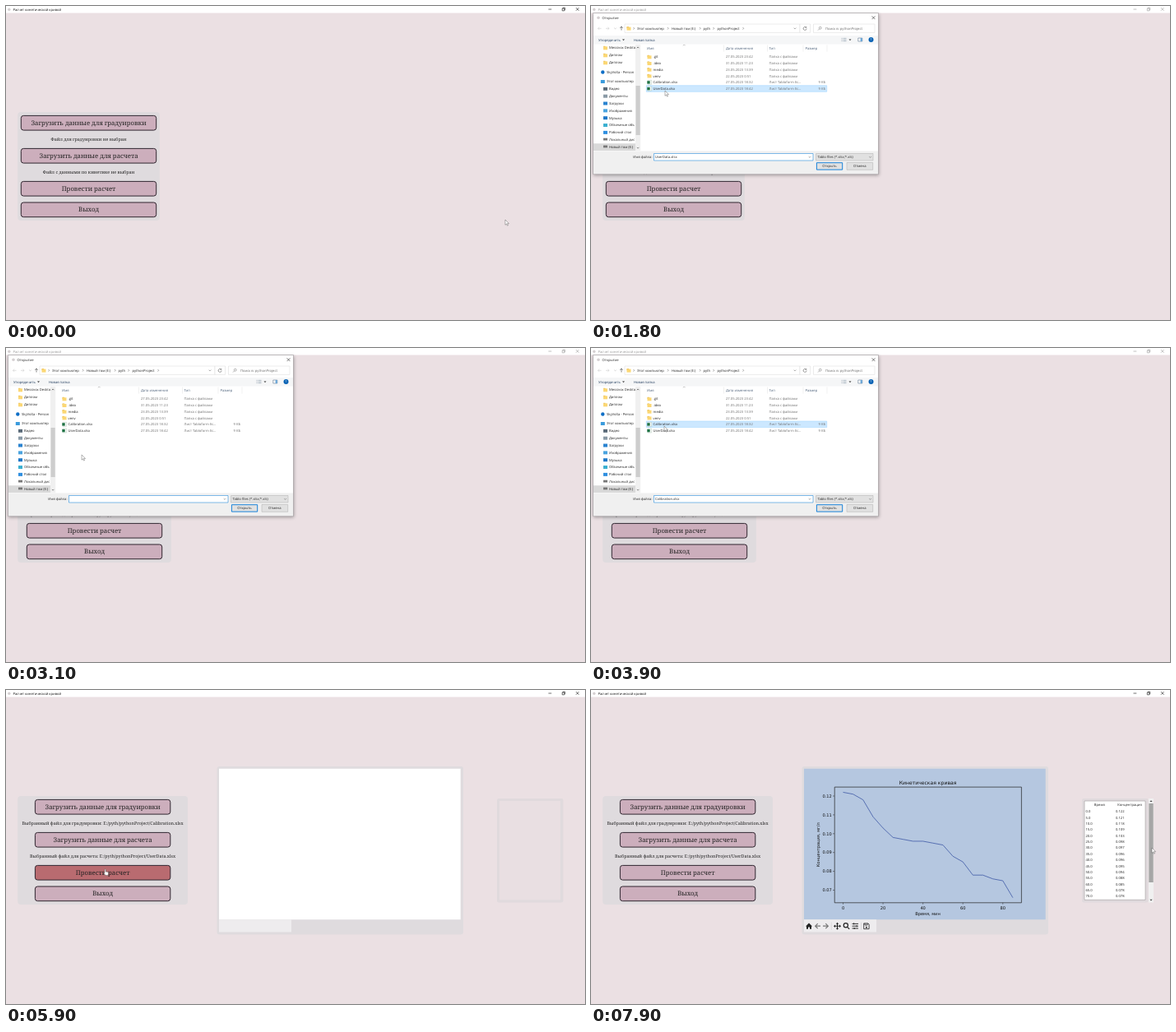
An HTML page with a canvas for the animation above (8000 ms loop, 704 px wide and 382 px high).

```html
<!DOCTYPE html>
<html lang="ru">
<head>
<meta charset="utf-8">
<title>Расчет кинетической кривой</title>
<style>
html, body { margin: 0; width: 704px; height: 382px; overflow: hidden; background: #ebe0e3; }
canvas { display: block; }
</style>
</head>
<body>
<canvas id="stage" width="704" height="382"></canvas>
<script>
const ctx = document.getElementById('stage').getContext('2d');
ctx.textRendering = 'geometricPrecision';

const UI = '"Open Sans", sans-serif', SERIF = '"Noto Serif", serif', PLOT = '"DejaVu Sans", sans-serif';
const DARK = '#222';

// Drawing helpers; text is centred vertically on y
function text(s, x, y, { size = 4.15, color = DARK, font = UI, align = 'left' } = {}) {
  ctx.font = `${size}px ${font}`;
  ctx.fillStyle = color;
  ctx.textAlign = align;
  ctx.fillText(s, x, y + size * 0.35);
}
function box(x, y, w, h, fill, border, radius = 0, width = 0.5) {
  ctx.beginPath();
  ctx.roundRect(x, y, w, h, radius);
  if (fill) { ctx.fillStyle = fill; ctx.fill(); }
  if (border) { ctx.strokeStyle = border; ctx.lineWidth = width; ctx.stroke(); }
}
function stroke(path, color = DARK, width = 0.6) {
  ctx.strokeStyle = color;
  ctx.lineWidth = width;
  ctx.stroke(new Path2D(path));
}
function fill(path, color = DARK) {
  ctx.fillStyle = color;
  ctx.fill(new Path2D(path));
}
function dot(x, y, r, color) {
  ctx.beginPath();
  ctx.arc(x, y, r, 0, 7);
  ctx.fillStyle = color;
  ctx.fill();
}
const chevron = (x, y, color = '#555') => stroke(`M${x - 1.3} ${y - 0.7}l1.3 1.3 1.3-1.3`, color, 0.5);
function folder(x, y) {
  box(x, y - 2.2, 2.6, 2, '#e5b84b');
  box(x, y - 1.7, 5, 4, '#fbd774');
}

// Pointer path: time, x, y
const pointerPath = [
  [100, 607, 260], [600, 91, 188], [900, 91, 188], [1800, 90, 103], [1900, 90, 103],
  [2400, 93, 141], [2900, 93, 141], [3600, 89, 95], [4490, 89, 95], [5400, 120, 218],
  [6500, 120, 218], [6600, 408, 112], [6700, 408, 112], [7600, 693, 196], [7900, 682, 192],
];
function pointerAt(t) {
  const i = pointerPath.findIndex(k => k[0] >= t);
  if (i < 1) return pointerPath.at(i).slice(1);
  const [t0, x0, y0] = pointerPath[i - 1], [t1, x1, y1] = pointerPath[i];
  const u = (t - t0) / (t1 - t0);
  const e = (u + u * u * (3 - 2 * u)) / 2;
  return [x0 + (x1 - x0) * e, y0 + (y1 - y0) * e];
}
function drawPointer(x, y, hand) {
  ctx.save();
  ctx.translate(x, y);
  const shape = hand
    ? 'M0 .6q.7-1 1.3 0V3l2.6.6q.8.3.7 1.2L4 7.6H1L-1 5q-.4-1 .4-.8L0 4.8z'
    : 'M0 0V6.3L1.5 5 2.5 7.2 3.5 6.8 2.5 4.6H4.5z';
  fill(shape, '#fff');
  stroke(shape, '#444', 0.4);
  ctx.restore();
}

function drawTitleBar(active) {
  const ink = active ? '#111' : '#999';
  box(0, 0, 704, 8.6, '#fff');
  dot(3.8, 4.3, 1.7, '#d5d0d2');
  text('Расчет кинетической кривой', 8.4, 4.2, { color: ink });
  stroke('M659.5 4h3.8M676.3 3h2.6v2.8h-2.6zM677.2 3v-.9h2.5v2.7h-.8M693 2.1l3.6 3.6M696.6 2.1l-3.6 3.6', ink);
}

const buttons = [
  [133, 'Загрузить данные для градуировки'], [173, 'Загрузить данные для расчета'],
  [213, 'Провести расчет'], [238.6, 'Выход'],
];
function drawMenu(width, hovered, calibration, data) {
  const cx = 14.2 + width / 2;
  box(14.2, 129, width, 132, '#dfdbde', null, 4);
  buttons.forEach(([y, label], i) => {
    box(cx - 82.2, y + 0.4, 164.4, 17.7, i === hovered ? '#b96b70' : '#ccaebc', '#30252f', 3, 1);
    text(label, cx, y + 8.8, { size: 7.75, font: SERIF, align: 'center' });
  });
  const note = { size: 5.38, font: SERIF, align: 'center' };
  text(calibration ? 'Выбранный файл для градуировки: E:/pyth/pythonProject/Calibration.xlsx'
    : 'Файл для градуировки не выбран', cx, 162, note);
  text(data ? 'Выбранный файл для расчета: E:/pyth/pythonProject/UserData.xlsx'
    : 'Файл с данными по кинетике не выбран', cx, 202, note);
}

const places = ['Messivox Deskto', 'Диплом', 'Диплом', 'SkyVolta - Person', 'Этот компьютер', 'Видео', 'Документы',
  'Загрузки', 'Изображения', 'Музыка', 'Объемные объ', 'Рабочий стол', 'Локальный дис', 'Новый том (E:)'];
const placeColors = ['#3a9bdc', '#5a6a78', '#8a9aa6', '#2a83d0', '#4aa3df', '#1e78c8', '#3ab0d0', '#2f8fe0', '#777', '#777'];
const files = [
  ['.git', '27.05.2023 23:42'], ['.idea', '31.05.2023 11:23'], ['media', '23.05.2023 13:39'],
  ['venv', '22.05.2023 0:51'], ['Calibration.xlsx', '27.05.2023 18:32'], ['UserData.xlsx', '27.05.2023 18:42'],
];

function drawDialog(selected, [px, py]) {
  ctx.save();
  ctx.shadowColor = 'rgba(0,0,0,.35)';
  ctx.shadowBlur = 4;
  ctx.shadowOffsetY = 1;
  box(2.5, 8.5, 347, 196, '#fff');
  ctx.restore();
  box(2.5, 8.5, 347, 196, null, '#8a8588');

  dot(9, 14.3, 1.8, '#d5d0d2');
  text('Открытие', 13.6, 14.3);
  stroke('M341.6 12.3l3.8 3.8M345.4 12.3l-3.8 3.8');

  // Address row
  stroke('M12.5 27.3h-4l1.6-1.6M8.500 27.3l1.600 1.600M18 27.3h4l-1.6-1.6M22 27.3l-1.6 1.6', '#ccc');
  chevron(29.5, 27.3, '#aaa');
  stroke('M37 29.500v-4.500l-1.700 1.700M37 25l1.700 1.700', '#333');
  box(41, 22, 213, 10.4, '#fff', '#d9d9d9');
  box(254, 22, 12.6, 10.4, '#fff', '#d9d9d9');
  folder(43.5, 27.3);
  [['Этот компьютер', 56], ['Новый том (E:)', 98], ['pyth', 136.5], ['pythonProject', 153.5]]
    .forEach(([s, x]) => text(s, x, 27.3));
  for (const x of [51.5, 93, 132, 148.5, 184.5]) stroke(`M${x} 26l1.200 1.300-1.200 1.300`, '#555', 0.5);
  chevron(248, 27.3);
  stroke('M261.600 26a2 2 0 1 0 .5 1.500M261.800 24.900v1.400h-1.400', '#444', 0.5);
  box(270.5, 22, 74.500, 10.4, '#fff', '#d9d9d9');
  stroke('M277.500 28l-1.500 1.500M277.300 26.700a1.400 1.400 0 1 0 2.800 0a1.400 1.400 0 1 0-2.800 0', '#666', 0.5);
  text('Поиск в: pythonProject', 285, 27.3, { color: '#666' });

  // Command row
  box(3, 36, 346, 10.500, '#f5f6f7');
  text('Упорядочить', 9, 41.2, { color: '#1e395b' });
  fill('M38 40.500h3l-1.500 1.600z');
  text('Новая папка', 52, 41.2, { color: '#1e395b' });
  for (const y of [39.300, 41, 42.700]) stroke(`M304.500 ${y}h1.200M306.500 ${y}h4`, '#8a9aaa');
  fill('M313.500 40.500h3l-1.500 1.600z');
  box(324.8, 39, 5, 4, '#fff', '#44607c');
  box(327.6, 39, 2.2, 4, '#6aa6d8');
  dot(340.5, 41, 3, '#0a63b5');
  text('?', 340.5, 41, { color: '#fff', align: 'center' });

  // Places
  box(3, 167.2, 51, 8.8, '#d9d9d9');
  places.forEach((s, i) => {
    const y = i < 3 ? 51 + 9 * i : i < 4 ? 80.5 : 92 + (i - 4) * 8.84;
    const root = i === 3 || i === 4;
    if (i < 3) folder(15, y);
    else if (i === 3) dot(14.300, y, 2.2, '#0f6fc6');
    else box(root ? 11.800 : 15, y - 2, 5, i > 11 ? 2.800 : 4, placeColors[(i - 4) % 10]);
    text(s, root ? 19 : 22, y);
  });
  box(54, 47, 6.2, 129, '#f0f0f0');
  box(54.5, 97, 5.2, 60, '#cdcdcd');
  stroke('M55.800 51.200l1.300-1.300 1.300 1.300');
  chevron(57.1, 172.6, DARK);

  // File list
  [['Имя', 68], ['Дата изменения', 164], ['Тип', 216.5], ['Размер', 260.5]]
    .forEach(([s, x]) => text(s, x, 51.3, { color: '#4c607a' }));
  for (const x of [161.5, 214.500, 258, 287]) stroke(`M${x} 47.500v8`, '#e0e0e0', 0.5);
  stroke('M112 48.200l1.300-1.300 1.300 1.300', '#666', 0.4);
  files.forEach(([name, date], i) => {
    const y = 62 + i * 7.7, sheet = i > 3, gray = { color: '#6d6d6d' };
    const over = px > 67 && px < 287 && Math.abs(py - y) < 3.85;
    if (i === selected) box(67.3, y - 3.8, 219.400, 7.6, '#cce8ff', '#99d1ff');
    else if (over) box(67.3, y - 3.8, 219.4, 7.6, '#e5f3ff');
    if (sheet) {
      box(69, y - 2.5, 4.600, 5, '#fff', '#9ab5a5', 0, 0.4);
      box(68.3, y - 1.600, 3.400, 3.400, '#1f7244');
    } else folder(68.5, y);
    text(name, 75.600, y);
    text(date, 164, y, gray);
    text(sheet ? 'Лист Tabloform Ec...' : 'Папка с файлами', 216.5, y, gray);
    if (sheet) text('9 КБ', 285, y, { ...gray, align: 'right' });
  });

  // Footer
  box(3, 176.500, 346, 27.700, '#f0f0f0');
  text('Имя файла:', 74.5, 183.8, { align: 'right' });
  box(76.5, 179.500, 193.500, 8.500, '#fff', '#0078d7');
  if (selected >= 0) text(files[selected][0], 78, 183.8);
  chevron(266, 183.8);
  box(273.500, 179.500, 69.500, 8.500, '#e1e1e1', '#adadad');
  text('Tablo files (*.xlsx;*.xls)', 275.5, 183.8);
  chevron(339.5, 183.8);
  box(274.4, 190.700, 31.300, 8.400, '#e1e1e1', '#0078d7', 0, 0.9);
  box(311, 190.500, 31.700, 8.800, '#e1e1e1', '#adadad');
  text('Открыть', 290, 194.9, { align: 'center' });
  text('Отмена', 326.8, 194.9, { align: 'center' });
}

const values = [122, 121, 118, 109, 103, 98, 97, 96, 96, 95, 94, 88, 85, 78, 78, 76, 75, 66].map(v => v / 1000);
const plotX = v => 306.5 + v * 2.428;
const plotY = v => 129 + (0.12 - v) * 2290;

function drawPlot(ready) {
  box(256.5, 93, 299.500, 204.500, '#dfdbde', null, 3);
  box(259, 95.700, 293.700, 183.500, ready ? '#b5c7e0' : '#fff');
  box(259, 279.200, 88, 15.300, '#eeecee');
  if (!ready) return;
  const small = { size: 5.1, font: PLOT, color: '#111', align: 'center' };
  text('Кинетическая кривая', 409.5, 112.4, { ...small, size: 6.1 });
  for (let v = 0; v <= 80; v += 20) {
    stroke(`M${plotX(v)} 258.700v2`, DARK, 0.5);
    text(v, plotX(v), 265, small);
  }
  for (let v = 7; v <= 12; v++) {
    const y = plotY(v / 100);
    stroke(`M296 ${y}h-2`, DARK, 0.5);
    text((v / 100).toFixed(2), 292.8, y, { ...small, align: 'right' });
  }
  text('Время, мин', 409.5, 271.8, small);
  ctx.save();
  ctx.translate(276, 188.3);
  ctx.rotate(-Math.PI / 2);
  text('Концентрация, мг/л', 0, 0, small);
  ctx.restore();
  stroke('M' + values.map((v, i) => `${plotX(i * 5)} ${plotY(v)}`).join('L'), '#3f5aa6', 0.8);
  box(296.2, 118.100, 227.200, 140.700, null, DARK, 0, 0.7);
}

function drawToolbar() {
  fill('M261 287.400l4-3.800 4 3.800h-1v3.400h-2v-2.200h-2v2.200h-2v-3.400z');
  stroke('M279 287.200h-6M275.700 284.200l-3 3 3 3', '#777', 1.2);
  stroke('M282 287.200h6M285.300 284.200l3 3-3 3', '#777', 1.2);
  stroke('M292.300 282.500v9.500M328.500 282.500v9.500', '#c8c8c8', 0.5);
  stroke('M295.800 287.200h7.400M299.500 283.500v7.400', DARK, 1);
  fill('M299.500 282.700l1.700 2h-3.400zM299.500 291.700l1.700-2h-3.400zM295 287.200l2-1.700v3.400zM304 287.200l-2-1.700v3.400z');
  stroke('M307.200 286.300a2.600 2.600 0 1 0 5.200 0a2.600 2.600 0 1 0-5.200 0M311.700 288.300l2.500 2.600', DARK, 1.2);
  stroke('M317.500 284.400h7.500M317.500 287.200h7.500M317.500 290h7.500M319.600 283.400v2M323 286.200v2M320.200 289v2', DARK, 0.9);
  stroke('M331.700 283.900h5.200l1.200 1.200v5.600h-6.400zM333 284v2h3v-2', DARK, 0.8);
  dot(334.9, 288.700, 1, DARK);
}

function drawTable(ready, thumbActive) {
  box(597, 132, 80.500, 126.500, '#e0dadd', null, 2);
  box(600, 135, 74, 120.300, ready ? '#fff' : '#e9dfe2');
  if (!ready) return;
  box(600, 135, 74, 120.300, null, '#8d888b', 0, 0.5);
  text('Время', 618.3, 140, { align: 'center' });
  text('Концентрация', 655, 140, { align: 'center' });
  for (let i = 0; i < 15; i++) {
    const y = 148 + i * 7.34;
    text((i * 5).toFixed(1), 601.5, y);
    text(values[i].toFixed(3), 638, y);
  }
  box(678, 132, 6, 126.500, '#f0f0f0');
  box(678.3, 138, 5.400, 96, thumbActive ? '#a6a6a6' : '#cdcdcd');
  fill('M679.400 136h3.200l-1.600-1.800zM679.400 254.800h3.200l-1.600 1.800z', '#444');
}

function draw(t) {
  const within = (a, b) => t >= a && t < b;
  const pointer = pointerAt(t), [px, py] = pointer;
  const active = !within(800, 2000) && !within(2800, 4100);
  const width = t < 2200 ? 172.6 : t < 4400 ? 186.6 : 206.8;
  const under = buttons.findIndex(([y]) => py >= y && py <= y + 18.500 && Math.abs(px - 14.2 - width / 2) < 82);
  const hovered = !active ? -1 : within(6600, 6800) ? 2 : under;

  box(0, 0, 704, 382, '#ebe0e3');
  drawTitleBar(active);
  drawMenu(width, hovered, t >= 4400, t >= 2200);
  if (t >= 5900) {
    drawPlot(t >= 6000);
    drawTable(t >= 6100, t >= 7700);
    if (t >= 6000) drawToolbar();
  }
  if (within(1000, 2000)) drawDialog(t >= 1800 ? 5 : -1, pointer);
  if (within(3000, 4100)) drawDialog(t >= 3900 ? 4 : -1, pointer);
  drawPointer(px, py, active && under >= 0);
}

function tick() {
  draw(Math.floor(performance.now() % 8000 / 100) * 100);
  requestAnimationFrame(tick);
}
tick();
</script>
</body>
</html>
```
